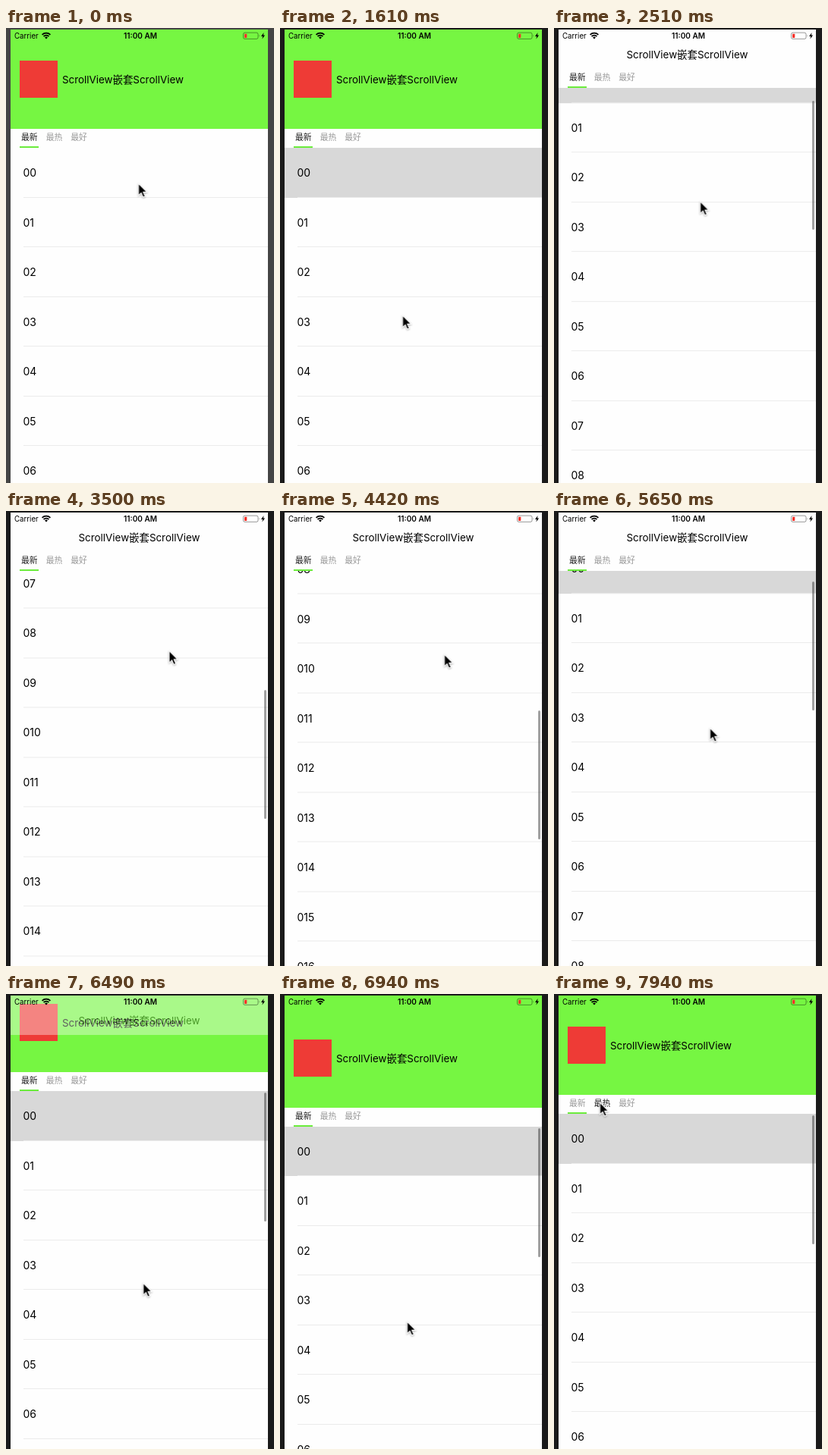
These frames come from a looping animation (353 px wide and 600 px high, 8000 ms). An HTML page:

```html
<!DOCTYPE html>
<html lang="zh-CN">
<head>
<meta charset="utf-8">
<title>Nested scroll</title>
<style>
/* --s: total scroll. The first 79px collapse the header, the rest moves the list. */
@property --s { syntax: "<number>"; inherits: true; initial-value: 0; }

html, body { margin: 0; width: 100%; height: 100%; overflow: hidden; }
body {
  position: relative; background: #1a1a1a; color: #000;
  font-family: Inter, "Noto Sans CJK SC", "Noto Sans CJK", sans-serif;
  animation: bezel 8s step-end infinite;
}
#phone, #phone * { position: absolute; box-sizing: border-box; white-space: nowrap; }
#phone {
  left: 0; top: 0; width: 353px; height: 600px;
  clip-path: inset(2px 8px 0 6px);
  background: #fefefe;
  animation: scroll 8s linear infinite;
}
#phone > div {
  --fold: calc(min(var(--s), 79) * 1px);
  --list: calc(max(var(--s) - 79, 0) * 1px);
  left: 6px; width: 339px;
}

#phone > .list { top: calc(158px - var(--fold)); height: 600px; overflow: hidden; }
.rows { left: 0; top: 0; width: 339px; transform: translateY(calc(var(--list) * -1)); }
.row { left: 0; width: 339px; height: 65.5px; padding-left: 16.5px; font-size: 14px; line-height: 65.5px; }
.row::after {
  content: ""; position: absolute; left: 16.5px; right: 0; bottom: 0;
  height: 1px; background: #ebebeb;
}
.row:first-child { animation: pick 8s step-end infinite; }

#phone > .bar {
  left: 340.3px; width: 2.5px; height: 170px; border-radius: 2px;
  top: calc(160px - var(--fold) + var(--list) * .326);
  background: rgba(0, 0, 0, .37);
  animation: bar 8s linear infinite;
}

#phone > .head { top: 0; height: calc(133.3px - var(--fold)); overflow: hidden; background: #76f642; }
.head i { left: 12px; bottom: 41px; width: 50px; height: 49.5px; background: #ee3b36; }
.title { font-size: 13.4px; line-height: 20px; }
.head .title { left: 68px; bottom: 55.3px; }

#phone > .tabs { top: calc(133.3px - var(--fold)); height: 24.7px; background: #fefefe; }
.tabs span { top: 0; font-size: 10.8px; line-height: 24.5px; color: #999; }
.tabs span:nth-child(1) { left: 14px; animation: tabA 8s step-end infinite; }
.tabs span:nth-child(2) { left: 46.7px; animation: tabB 8s step-end infinite; }
.tabs span:nth-child(3) { left: 79.3px; }
.tabs i { left: 12px; bottom: 0; width: 25px; height: 1.7px; background: #6bec3c; }

#phone > .nav { top: 0; height: 54.3px; background: #fefefe; opacity: calc(var(--s) / 79); }
.nav .title { left: 0; width: 339px; top: 25px; text-align: center; }

#phone > .status { top: 0; height: 20px; font-size: 9.7px; line-height: 21px; }
.status b { left: 1.5px; width: 339px; text-align: center; font-weight: 600; font-size: 10px; }
.status span { left: 5px; }
.status svg { left: -6px; top: 0; }

#cursor {
  position: absolute; left: 0; top: 0; overflow: visible;
  filter: drop-shadow(0 1px 1px rgba(0, 0, 0, .3));
  animation: cursor 8s linear infinite;
}

@keyframes bezel { 0% { background: #444; } 7.375%, 100% { background: #1a1a1a; } }
@keyframes pick { 0% { background: #fefefe; } 9.625%, 100% { background: #d8d8d8; } }
@keyframes tabA { 0% { color: #222; } 99.25%, 100% { color: #999; } }
@keyframes tabB { 0% { color: #999; } 99.25%, 100% { color: #222; } }
@keyframes bar { 0%, 23.9% { opacity: 0; } 26%, 100% { opacity: 1; } }

@keyframes scroll {
  0%, 23.875% { --s: 0; animation-timing-function: cubic-bezier(.4, .2, .7, .75); }
  31.375% { --s: 124.5; }
  33.5% { --s: 180; animation-timing-function: cubic-bezier(.2, .5, .4, 1); }
  55.25% { --s: 638.5; animation-timing-function: cubic-bezier(.5, 0, .8, .7); }
  58.75% { --s: 520; }
  65.625% { --s: 175; animation-timing-function: cubic-bezier(.2, .6, .6, .9); }
  70.625% { --s: 115; }
  75.5% { --s: 77; }
  86.75% { --s: -17; animation-timing-function: cubic-bezier(.3, .4, .4, 1); }
  92.5%, 100% { --s: 0; }
}

@keyframes cursor {
  0%, 11.5% { transform: translate(174.5px, 205px); animation-timing-function: ease-in-out; }
  20.125%, 23.5% { transform: translate(161.5px, 379px); animation-timing-function: cubic-bezier(.4, .2, .7, .75); }
  31.375% { transform: translate(192.5px, 229px); }
  34% { transform: translate(212px, 176px); animation-timing-function: ease-out; }
  55.25% { transform: translate(216.5px, 189px); animation-timing-function: ease-in; }
  59% { transform: translate(213px, 225px); animation-timing-function: ease-out; }
  66% { transform: translate(207px, 270px); }
  70.625% { transform: translate(205.5px, 286px); }
  86.75% { transform: translate(167.5px, 432px); animation-timing-function: ease-in-out; }
  95.6%, 100% { transform: translate(60.5px, 143px); }
}
</style>
</head>
<body>
<div id="phone">
  <div class="list"><div class="rows"></div></div>
  <div class="bar"></div>
  <div class="head"><i></i><span class="title">ScrollView嵌套ScrollView</span></div>
  <div class="tabs"><span>最新</span><span>最热</span><span>最好</span><i></i></div>
  <div class="nav"><span class="title">ScrollView嵌套ScrollView</span></div>
  <div class="status">
    <span>Carrier</span><b>11:00 AM</b>
    <svg width="353" height="20">
      <g fill="none" stroke="#000" stroke-width="1.8">
        <path d="M47.6 8.9a7.7 7.7 0 0 1 10.8 0M49.6 11a4.8 4.8 0 0 1 6.8 0"/>
      </g>
      <path d="M53 14.4l-1.9-2a2.7 2.7 0 0 1 3.8 0z"/>
      <rect x="312.5" y="6.2" width="19.5" height="8.2" rx="2" fill="none" stroke="#000" stroke-opacity=".4"/>
      <path d="M333 8.8q1.4 1.5 0 3z" fill-opacity=".4"/>
      <rect x="314" y="7.7" width="3.3" height="5.2" rx=".6" fill="#f5342c"/>
      <path d="M339.6 6l-3.6 5h2.2l-.8 3.6 3.7-5h-2.2z"/>
    </svg>
  </div>
</div>
<svg id="cursor" width="14" height="20">
  <path d="M0 0V15.8L3.6 12.4 6 18 8.7 16.9 6.3 11.4H11.2Z" stroke="#fff" stroke-width="1.1"/>
</svg>
<script>
const rows = document.querySelector('.rows');
for (let i = 0; i < 25; i++) {
  const row = document.createElement('div');
  row.className = 'row';
  row.textContent = '0' + i;
  row.style.top = i * 65.5 + 'px';
  rows.append(row);
}
</script>
</body>
</html>
```
